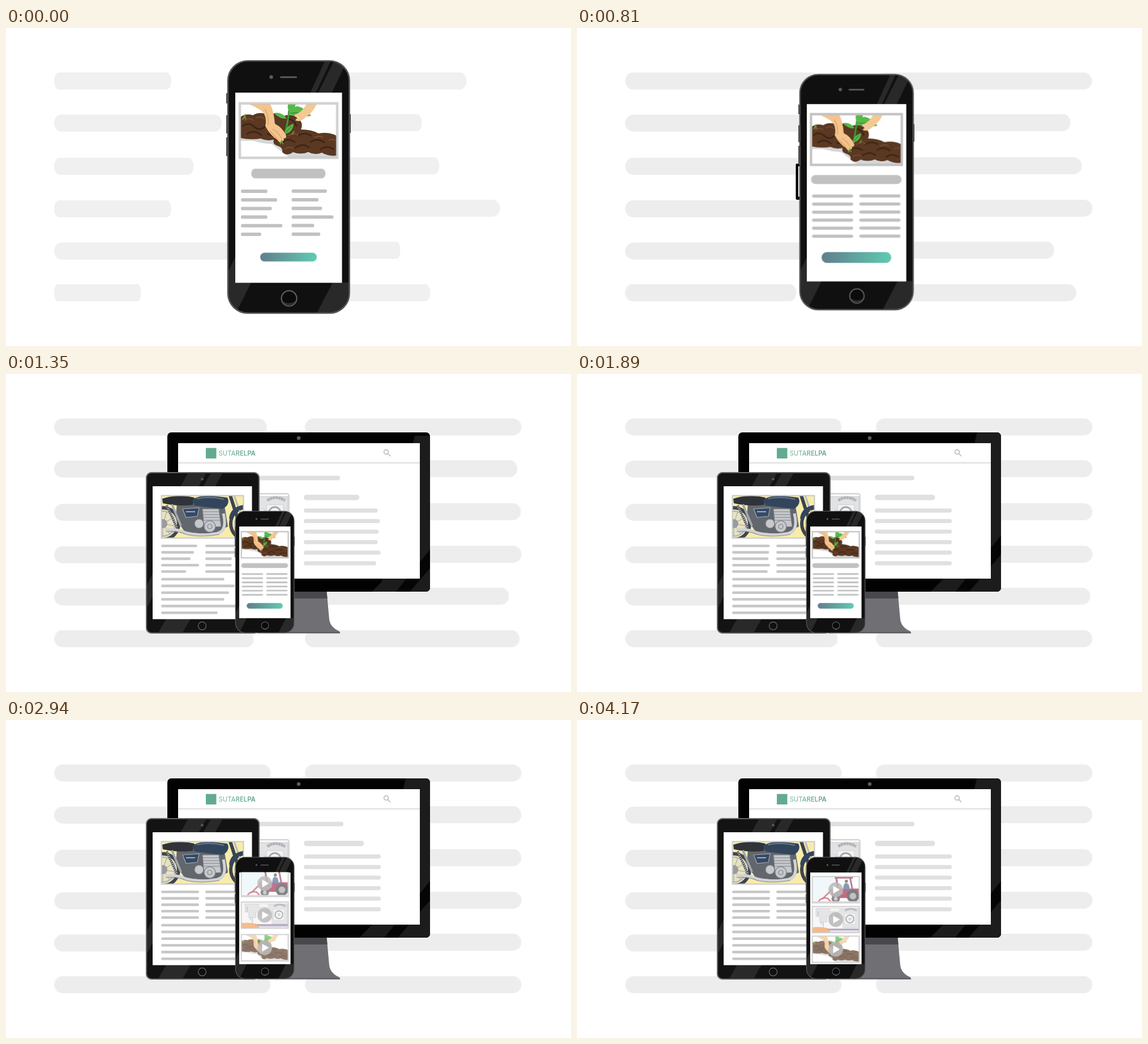
Recreate the animation shown at these times as an HTML page. Size 998 px wide and 561 px high, loop 4200 ms.

```html
<!DOCTYPE html>
<html lang="en">
<head>
<meta charset="utf-8">
<title>Learning on every screen</title>
<style>
html, body { margin: 0; width: 100%; height: 100%; overflow: hidden; background: #fff; }
svg { display: block; width: 998px; height: 561px; }

#bars, #phone, #monitor, #tablet, .shine, .photo, .fade, .button, .ripple, .page, .list, .card, .frame {
  animation: 4200ms linear infinite;
}
#bars { animation-name: tint; }
#phone { transform-origin: 499px 504px; animation-name: phone; }
#monitor { transform-origin: 416px 279px; animation-name: monitor; }
#tablet { transform-origin: 444px 315.5px; animation-name: tablet; }
.shine { animation-name: shine; }
.photo { transform-origin: 346.5px 252px; animation-name: photo; }
.desk { animation-name: desk; }
.notes { animation-name: notes; }
.button { transform-origin: 499px 404px; animation-name: button; }
.ripple { transform-origin: 499px 404px; animation-name: ripple; }
.page { animation-name: leave; }
.list { animation-name: enter; }
.card { animation-name: settle; }
.first-frame { animation-name: frame; }
.grow { transform-box: fill-box; }

@keyframes tint { 0% { fill: #f0f0f1; } 12%, 100% { fill: #ededed; } }
@keyframes phone {
  0%, 17.5% { transform: none; animation-timing-function: cubic-bezier(.333, 0, .667, 1); }
  25.5%, 100% { transform: translate(-42px, -47px) scale(.482); }
}
@keyframes monitor {
  0%, 16.67% { transform: scale(0); animation-timing-function: cubic-bezier(.333, 0, .667, 1); }
  25.26%, 100% { transform: none; }
}
@keyframes tablet {
  0%, 16.9% { transform: scale(0); animation-timing-function: cubic-bezier(.333, 0, .667, 1); }
  25.5%, 100% { transform: none; }
}
@keyframes shine {
  0%, 20% { transform: translate(75px, 30px); animation-timing-function: cubic-bezier(.333, 1, .667, 1); }
  50%, 100% { transform: none; }
}
@keyframes photo {
  0%, 21.4% { transform: scale(.4); opacity: 0; }
  26.2%, 100% { transform: none; opacity: 1; }
}
@keyframes desk { 0%, 20% { opacity: 0; } 25%, 100% { opacity: 1; } }
@keyframes notes { 0%, 24% { opacity: 0; } 28%, 100% { opacity: 1; } }
@keyframes button {
  0% { transform: scale(.757); animation-timing-function: cubic-bezier(.333, 1, .667, 1); }
  17%, 55.5% { transform: none; animation-timing-function: ease-in-out; }
  59.3% { transform: scale(.93); animation-timing-function: ease-in-out; }
  63%, 100% { transform: none; }
}
@keyframes ripple {
  0%, 56% { transform: scale(0); opacity: .65; }
  59.3% { transform: none; opacity: .6; }
  65%, 100% { transform: scale(2.2); opacity: 0; }
}
@keyframes leave { 0%, 63.8% { opacity: 1; } 67.9%, 100% { opacity: 0; } }
@keyframes enter { 0%, 64.8% { opacity: 0; } 70.2%, 100% { opacity: 1; } }
@keyframes settle {
  0%, 65.5% { transform: translateY(var(--rise)); animation-timing-function: cubic-bezier(.333, 1, .667, 1); }
  100% { transform: none; }
}
@keyframes frame { 0% { opacity: .75; } 12%, 100% { opacity: 1; } }
</style>
</head>
<body>
<svg viewBox="0 0 998 561" xmlns="http://www.w3.org/2000/svg">
<defs>
  <linearGradient id="teal"><stop stop-color="#627e8e"/><stop offset="1" stop-color="#60ccb0"/></linearGradient>
  <linearGradient id="brand"><stop stop-color="#8cc5a6"/><stop offset="1" stop-color="#5f9f94"/></linearGradient>
  <clipPath id="inner"><rect x="414" y="134" width="170" height="94"/></clipPath>
  <clipPath id="phoneBody"><rect x="392" y="58" width="214" height="445" rx="35"/></clipPath>
  <clipPath id="phoneScreen"><rect x="405" y="114" width="188.500" height="335.500"/></clipPath>
  <clipPath id="tabletBody"><rect x="248" y="174" width="199" height="283" rx="9"/></clipPath>
  <clipPath id="monitorBody"><rect x="285" y="103" width="464" height="281" rx="7"/></clipPath>
  <clipPath id="photoBox"><rect x="275" y="215" width="144" height="74"/></clipPath>
  <clipPath id="buttonBox"><rect x="433" y="394" width="132" height="20.500" rx="10"/></clipPath>

  <g id="garden" clip-path="url(#inner)">
    <rect x="414" y="134" width="170" height="94" fill="#fff"/>
    <path d="M414 192L480 196 520 220 584 221V228H500L470 205 452 203 436 199 414 199Z" fill="#d5d6da"/>
    <path d="M414 157Q424 150 436 154 446 147 462 152 474 148 488 156 506 149 516 160 526 167 521 179 540 179 552 186 570 183 584 190V225Q570 227 558 220 545 225 534 219 520 224 507 219 496 227 488 219 490 211 480 208 470 205 473 197 460 200 450 195 432 198 414 194Z" fill="#5a3822"/>
    <g fill="none" stroke="#3b2314" stroke-width="2.500" stroke-linecap="round">
      <path d="M418 173q10-8 20 1t19 0M426 187q12-9 25 2M462 187q11 2 16 10M487 203q9-11 23-2M511 211q14-9 24 0M538 201q13-8 24 1M556 214q10-8 23 0M496 160q13 1 17 13M516 190q11-7 23 0"/>
    </g>
    <g fill="none" stroke="#7a4d2e" stroke-width="2" stroke-linecap="round">
      <path d="M422 163q8-6 15 0M442 159q7-5 14 1M500 190q8-7 16-1M545 193q9-4 15 0M493 213q8-5 14-1M571 198q5-3 10 0"/>
    </g>
    <path d="M491 194Q497 174 500 145" fill="none" stroke="#3f9a3c" stroke-width="3"/>
    <path d="M500 152Q501 139 515 138 529 141 539 155 519 159 500 152ZM499 146Q495 135 502 131L512 133Q511 143 499 146ZM496 160Q484 161 473 150 488 147 496 160ZM493 187Q493 173 508 169 507 183 493 187Z" fill="#58b947"/>
    <path d="M501 151Q516 147 536 154M495 184L504 173" fill="none" stroke="#2f8b37" stroke-width="1.200"/>
    <path d="M531 134H549Q542 149 530 157 520 167 511 163 512 160 518 157 510 159 510 153 523 149 531 134Z" fill="#f4c893"/>
    <path d="M426 133H466Q473 145 475 169 488 175 495 190 495 196 490 194 493 200 486 200 485 205 480 198 467 190 458 173 462 154 450 145 439 138 426 133Z" fill="#f4c48c"/>
    <path d="M471 178Q481 184 487 195M466 182Q477 192 481 199M457 143Q465 155 463 171" fill="none" stroke="#d99a61" stroke-width="1.200"/>
    <path d="M418 162l4-8 1 7M484 205l3-6 2 6M505 188l4-6" fill="none" stroke="#6a9b3c" stroke-width="2"/>
  </g>

  <g id="sewing" clip-path="url(#inner)">
    <rect x="414" y="134" width="170" height="94" fill="#f4f4f5"/>
    <path d="M427 140H583V212H526V170H466V190H440V170H427Z" fill="#d9dadd" stroke="#b4b5b9" stroke-width="1.500"/>
    <g fill="#eeeeef" stroke="#b9babd" stroke-width="1.200">
      <rect x="477" y="139" width="36" height="13" rx="4"/>
      <rect x="531" y="159" width="41" height="40" rx="4"/>
      <rect x="480" y="158" width="30" height="7" rx="3"/>
    </g>
    <path d="M533 149Q552 135 576 149" fill="none" stroke="#96989e" stroke-width="7" stroke-dasharray="6 1"/>
    <circle cx="551" cy="179" r="14" fill="#f6f6f6" stroke="#85888e" stroke-width="4"/>
    <circle cx="551" cy="179" r="6" fill="#c5c6ca"/>
    <path d="M453 190V211M446 190V200M434 150V168" stroke="#8d9097" stroke-width="2"/>
    <path d="M414 210Q448 205 478 216V228H414Z" fill="#f39a55"/>
    <path d="M462 214H584V221H478Z" fill="#9880a8"/>
    <path d="M478 221H584V228H478Z" fill="#dcdce0"/>
  </g>

  <g id="tractor" clip-path="url(#inner)">
    <rect x="414" y="134" width="170" height="94" fill="#fff"/>
    <path d="M414 134H500L494 190 455 215 414 220Z" fill="#eaf5fa"/>
    <path d="M500 134L509 183M551 134L560 180M495 137H562" fill="none" stroke="#9f3551" stroke-width="6"/>
    <path d="M482 188L515 177H583V212H486Z" fill="#a4334f"/>
    <path d="M488 194H526" stroke="#d46b7f" stroke-width="4"/>
    <path d="M527 178Q526 160 536 156L546 160 552 181Z" fill="#4d6f99"/>
    <circle cx="538" cy="150" r="6" fill="#685549"/>
    <circle cx="562" cy="204" r="23" fill="#45464b"/>
    <circle cx="562" cy="204" r="12" fill="#a8a9ad"/>
    <circle cx="499" cy="214" r="15" fill="#505157"/>
    <circle cx="499" cy="214" r="7" fill="#b7b7bb"/>
    <path d="M435 226Q445 207 470 213L482 226M449 216L487 178" fill="none" stroke="#c7485b" stroke-width="5"/>
    <path d="M414 225H584" stroke="#cfc8c4" stroke-width="4"/>
  </g>

  <g id="play">
    <circle cx="499" cy="181" r="27" fill="#bababa" opacity=".88"/>
    <path d="M490 167L514 181 490 195Z" fill="#fff"/>
  </g>
  <rect id="border" x="413" y="133" width="172" height="96" fill="none" stroke="#c3c3c3" stroke-width="4.500"/>
</defs>

<rect width="998" height="561" fill="#fff"/>
<g id="bars"></g>

<g id="monitor">
  <path d="M468 384H566.500L571 433Q573 447 589 454L590 457H444L445 454Q461 447 463 433Z" fill="#706f74"/>
  <path d="M468 384H566.500L567.600 396H467Z" fill="#49484d"/>
  <path d="M444 456.500H590" stroke="#55545a" stroke-width="2"/>
  <rect x="285" y="103" width="464" height="281" rx="7" fill="#020202"/>
  <g clip-path="url(#monitorBody)">
    <g class="shine">
      <path d="M706 103H850V384H624L648 360Z" fill="#1c1c1c"/>
      <path d="M749 284V318L692 384H668Z" fill="#050505"/>
    </g>
  </g>
  <rect x="304" y="122" width="427" height="239" fill="#fff"/>
  <circle cx="517" cy="113" r="3.300" fill="#5b5b5b"/>
  <rect x="304" y="155.500" width="427" height="2.500" fill="#e2e2e2"/>
  <rect x="353" y="130.500" width="18.500" height="18.500" fill="#62ab90"/>
  <text x="375.500" y="143.600" font-family="Inter, 'Open Sans', sans-serif" font-size="11.300" font-weight="500" fill="url(#brand)">SUTA<tspan font-weight="600">RELPA</tspan></text>
  <g fill="none" stroke="#b9b9b9" stroke-width="1.600"><circle cx="671.500" cy="137.500" r="3.900"/><path d="M674.500 140.500L679 145"/></g>
  <g class="fade desk">
    <g transform="translate(501 210) scale(.73) translate(-587 -131)">
      <use href="#sewing" opacity=".75"/>
      <rect x="412.500" y="132.500" width="173" height="97" rx="5" fill="none" stroke="#d2d2d2" stroke-width="3"/>
    </g>
    <g id="article" fill="#e0e0e0"></g>
  </g>
</g>

<g id="tablet">
  <rect x="248" y="174" width="199" height="283" rx="9" fill="#131313" stroke="#67676a" stroke-width="2"/>
  <g clip-path="url(#tabletBody)" fill="#292929">
    <path d="M322 174H354L340 199H308ZM362 174H383L369 199H348ZM283 432H326L311 458H268ZM249 372L260 350V391L249 412Z"/>
  </g>
  <rect x="248" y="174" width="199" height="283" rx="9" fill="none" stroke="#67676a" stroke-width="1.600"/>
  <rect x="259" y="198" width="175.500" height="234.500" fill="#fff"/>
  <circle cx="346.500" cy="185.500" r="2.300" fill="#59595b"/>
  <circle cx="346.500" cy="444.300" r="7" fill="#111" stroke="#6b6b6d" stroke-width="1.300"/>
  <g class="photo">
    <g clip-path="url(#photoBox)">
      <rect x="274" y="214" width="146" height="76" fill="#f7ecab"/>
      <g fill="none">
        <circle cx="277" cy="264" r="28" fill="#e9e3bd" stroke="#41454c" stroke-width="6"/>
        <circle cx="277" cy="264" r="22" stroke="#aeb1b5" stroke-width="2"/>
        <path d="M277 264L298 252M277 264L299 268M277 264L289 282M277 264L284 243M277 264V286" stroke="#9a9da2"/>
        <circle cx="277" cy="264" r="8" fill="#989ba0"/>
        <circle cx="426" cy="264" r="29" stroke="#41454c" stroke-width="6"/>
        <circle cx="426" cy="264" r="22" stroke="#aeb1b5" stroke-width="2"/>
      </g>
      <path d="M302 226L386 233 392 269 365 283 316 279 300 255Z" fill="#62666d"/>
      <path d="M276 220Q304 211 333 218L330 231Q302 234 277 228Z" fill="#303339"/>
      <path d="M329 224Q333 214 365 215L391 218Q397 230 383 238 355 235 333 232Z" fill="#33455c"/>
      <path d="M337 220Q360 215 385 221" fill="none" stroke="#677a90" stroke-width="2"/>
      <path d="M312 238L341 236 338 251 318 253Z" fill="#354a66" stroke="#a5a9ae" stroke-width="1.200"/>
      <path d="M318 243H334" stroke="#9faebd" stroke-width="2"/>
      <path d="M284 232L302 272M293 230L309 268" stroke="#a3a6ab" stroke-width="4"/>
      <path d="M284 232L302 272" stroke="#41454c" stroke-width="4" stroke-dasharray="1.500 2"/>
      <g fill="#c6c8cb" stroke="#7c8086" stroke-width="1.200">
        <path d="M347 238H376L380 269 350 271Z"/>
        <path d="M348 243H377M348 248H378M349 253H379M350 258H379" fill="none"/>
        <circle cx="341" cy="264" r="8"/><circle cx="360" cy="269" r="10"/><circle cx="360" cy="269" r="4"/>
      </g>
      <path d="M282 275Q304 273 317 280 342 287 375 281 391 276 384 246" fill="none" stroke="#d1d3d5" stroke-width="5"/>
      <path d="M282 278Q304 276 318 283 343 289 377 283" fill="none" stroke="#858990" stroke-width="1.200"/>
      <path d="M396 214L413 267" stroke="#3b434e" stroke-width="6"/>
      <path d="M403 214L419 261" stroke="#b8babd" stroke-width="3"/>
      <path d="M394 255Q396 235 419 231V237Q404 242 400 258Z" fill="#33455c"/>
    </g>
    <rect x="274.500" y="214.500" width="145" height="75" fill="none" stroke="#c9c9cb" stroke-width="2"/>
  </g>
  <g id="notes" class="fade notes" fill="#c7c7c7"></g>
</g>

<g id="phone">
  <path d="M390.500 115V133M390.500 154V186M390.500 193V226M607.500 152V185" stroke="#444446" stroke-width="3"/>
  <rect x="392" y="58" width="214.500" height="445" rx="35" fill="#101010"/>
  <g clip-path="url(#phoneBody)" fill="#292929">
    <path d="M564 57H574L547 115H537ZM580 57H603L575 115H551ZM577 449H610V505H548ZM407 400L385 445V505H405L433 449Z"/>
  </g>
  <rect x="392" y="58" width="214.500" height="445" rx="35" fill="none" stroke="#555557" stroke-width="2.600"/>
  <circle cx="468.500" cy="86.500" r="3.200" fill="#5b5b5d"/>
  <path d="M485.500 86.700H512.500" stroke="#5b5b5d" stroke-width="3" stroke-linecap="round"/>
  <circle cx="500" cy="477" r="13.500" fill="#0b0b0b" stroke="#666668" stroke-width="2"/>
  <path d="M488 481A12.500 12.500 0 0 0 512 481Q500 490 488 481Z" fill="#303032"/>
  <rect x="405" y="114" width="188.500" height="335.500" fill="#fff"/>
  <g clip-path="url(#phoneScreen)">
    <g class="page">
      <use href="#garden"/>
      <use href="#border" class="frame first-frame"/>
      <g id="lesson" fill="#c1c1c1"></g>
      <g class="button">
        <rect x="433" y="394" width="132" height="20.500" rx="10" fill="url(#teal)"/>
        <g clip-path="url(#buttonBox)"><circle class="ripple" cx="499" cy="404" r="33" fill="#467d88"/></g>
      </g>
    </g>
    <g class="list" id="list"></g>
  </g>
</g>
</svg>
<script>
const LOOP = 4200;
const OUT = 'cubic-bezier(.333, 1, .667, 1)';
const NS = 'http://www.w3.org/2000/svg';
const byId = id => document.getElementById(id);

// A rounded bar that stretches from a share of its width to all of it.
function bar(parent, x, y, w, h, from, start, end, origin = 'left') {
  const el = document.createElementNS(NS, 'rect');
  const box = { x, y, width: w, height: h, rx: h / 2 };
  for (const key in box) el.setAttribute(key, box[key]);
  el.setAttribute('class', 'grow');
  el.style.transformOrigin = origin;
  parent.append(el);
  const small = `scaleX(${from})`;
  el.animate([
    { offset: 0, transform: small },
    { offset: start / LOOP, transform: small, easing: OUT },
    { offset: end / LOOP, transform: 'scaleX(1)' },
    { offset: 1, transform: 'scaleX(1)' }
  ], { duration: LOOP, iterations: Infinity });
}

// Background: the shorter a bar starts, the longer it grows.
function backdrop(x, tops, gaps) {
  gaps.forEach((gap, i) => {
    bar(byId('bars'), x, tops[i], 382.5, 30, 1 - gap / 382.5, 0, Math.max(240, 13.1 * gap - 260));
  });
}
backdrop(85, [78.5, 152.7, 229, 304, 378.5, 452], [175.5, 86.5, 136, 175.5, 60, 229]);
backdrop(528, [78.5, 152, 228, 303, 377, 452], [97, 176, 145, 38, 214, 161]);

function column(id, x, y, step, w, h, shares, start, end) {
  shares.forEach((share, i) => bar(byId(id), x, y + i * step, w, h, share, start, end));
}

bar(byId('lesson'), 413, 248.3, 171.5, 17, .765, 0, 700, 'center');
column('lesson', 415, 285, 15.2, 78, 6, [.6, .82, .7, .6, .94, .46], 0, 720);
column('lesson', 504.5, 284.8, 15.2, 78, 6, [.8, .61, .69, .95, .51, .65], 0, 720);

bar(byId('article'), 438, 179.5, 158, 8, .47, 960, 1780, 'center');
bar(byId('article'), 526, 213, 106.5, 9.5, .45, 960, 1780);
column('article', 526, 237.2, 18.6, 136, 7.2, [.72, .91, .81, .72, .99, .58], 960, 1780);

column('notes', 274, 301, 11.3, 67, 4.6, [.92, .77, .61, 1, .41], 1100, 2600);
column('notes', 352, 301, 11.3, 67, 4.6, [.74, .83, .47, .47, .83], 1100, 2600);
column('notes', 274, 359.7, 11.85, 145, 4.6, [.6, .82, .7, .6, .94, .46], 1100, 2600);

byId('list').innerHTML = ['tractor', 'sewing', 'garden'].map((art, i) => `
  <g class="card" style="--rise:${[-35, -24, -9][i]}px">
    <g transform="translate(0 ${-4 + i * 109})">
      <use href="#${art}" opacity=".7"/>
      <use href="#border" opacity=".75"/>
      <use href="#play"/>
    </g>
  </g>`).join('');
</script>
</body>
</html>
```
